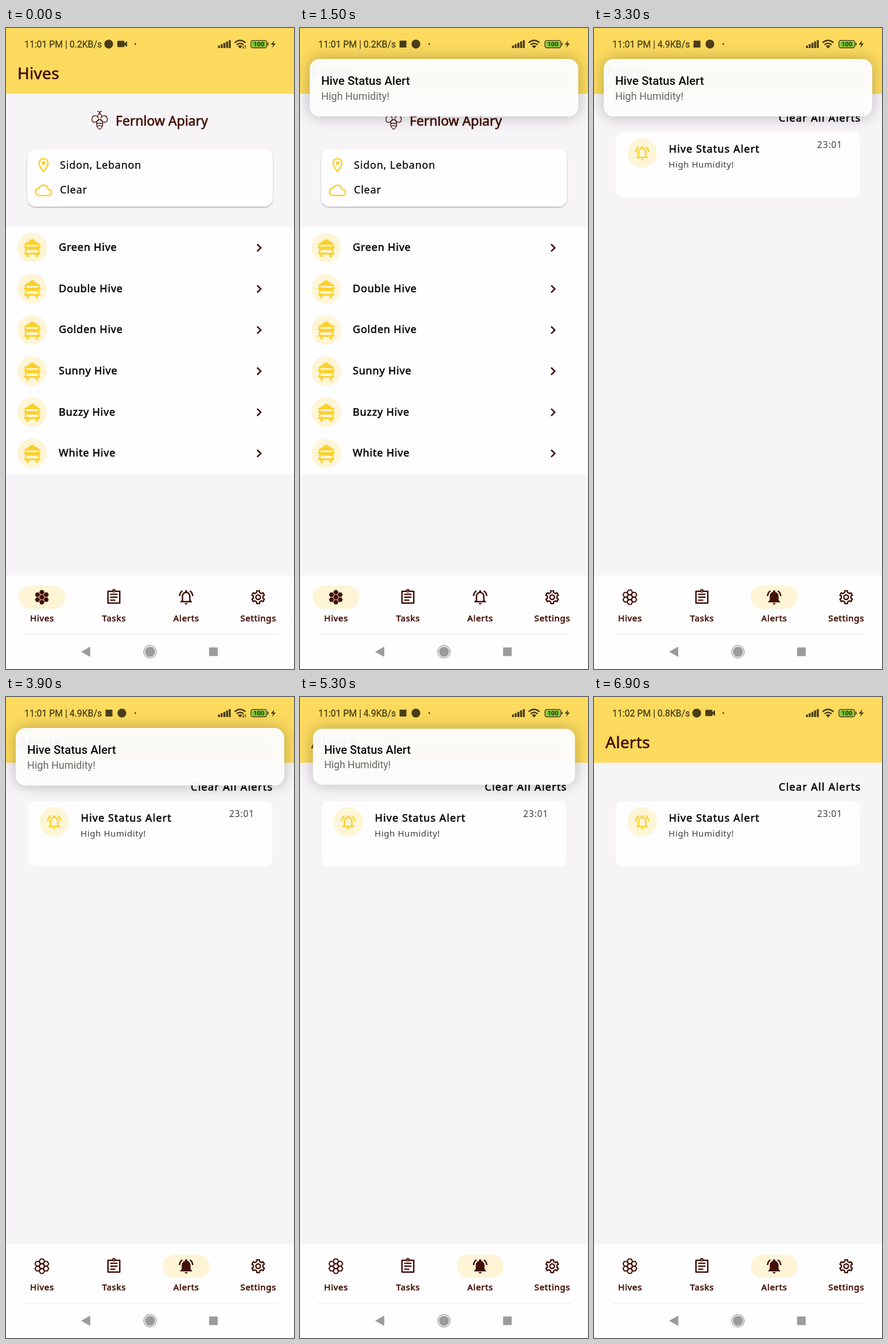
An HTML page that plays this animation: 502 by 1116 pixels, repeating every 7000 ms.

```html
<!DOCTYPE html>
<html lang="en">
<head>
<meta charset="utf-8">
<title>Hive alerts</title>
<style>
  html, body { margin: 0; width: 100%; height: 100%; overflow: hidden; background: #f6f4f7; }
  svg { display: block; width: 502px; height: 1116px; }
  text { font-family: "Noto Sans", "Open Sans", sans-serif; white-space: pre; fill: currentColor; }
  /* A thin outline gives the weights between regular and bold. */
  .medium { stroke: currentColor; stroke-width: .3px; }
  .semi { stroke: currentColor; stroke-width: .65px; }
  .title { font-size: 28px; letter-spacing: .3px; color: #431007; }
  .item { font-size: 18px; letter-spacing: .8px; color: #0b090b; }
  .tab { font-size: 15px; letter-spacing: .7px; color: #431007; text-anchor: middle; }
  .sys { font-family: Roboto, "Liberation Sans", sans-serif; }
  .line { fill: none; stroke-linecap: round; stroke-linejoin: round; }
</style>
</head>
<body>
<svg id="stage" viewBox="0 0 502 1116" xmlns="http://www.w3.org/2000/svg"></svg>
<script>
const BROWN = '#431007', GOLD = '#fbd02f', PALE = '#fdf5d6', INK = '#4a3d17', WHITE = '#fefdff';
const LOOP = 7000, STEP = 100, SWITCH = 3000, TABS = [62.7, 188, 314, 439.5];
const HIVES = ['Green', 'Double', 'Golden', 'Sunny', 'Buzzy', 'White'];

const text = (x, y, cls, s, more = '') => `<text x="${x}" y="${y}" class="${cls}" ${more}>${s}</text>`;
const rect = (x, y, w, h, fill, r = 0, more = '') =>
  `<rect x="${x}" y="${y}" width="${w}" height="${h}" rx="${r}" fill="${fill}" ${more}/>`;
const dot = (x, y, r, fill) => `<circle cx="${x}" cy="${y}" r="${r}" fill="${fill}"/>`;
const path = (d, more) => `<path d="${d}" ${more}/>`;
const stroke = (d, color, w) => path(d, `class="line" stroke="${color}" stroke-width="${w}"`);
const group = (id, body) => `<g id="${id}">${body}</g>`;
// Places a 24-unit icon around a centre point.
const icon = (x, y, body, k = 1.28) => `<g transform="translate(${x} ${y}) scale(${k}) translate(-12 -12)">${body}</g>`;
const polar = (r, deg) => {
  const a = deg * Math.PI / 180;
  return [(r * Math.cos(a)).toFixed(2), (r * Math.sin(a)).toFixed(2)];
};
const polygon = pts => 'M' + pts.map(p => p.join(' ')).join('L') + 'Z';

function honeycomb(x, y, solid) {
  const hex = polygon([0, 1, 2, 3, 4, 5].map(i => polar(solid ? 4.5 : 4.6, i * 60)));
  const centers = [[0, 0], ...[0, 1, 2, 3, 4, 5].map(i => polar(solid ? 8.7 : 8.4, i * 60 + 30))];
  const style = solid ? `fill="${BROWN}"` : `fill="none" stroke="${BROWN}" stroke-width="2"`;
  return centers.map(([a, b]) => path(hex, `transform="translate(${x + +a} ${y + +b})" ${style}`)).join('');
}

function gear(x, y) {
  const pts = [];
  for (let a = -90; a < 270; a += 60)
    pts.push(polar(8.6, a - 17), polar(11.4, a - 12), polar(11.4, a + 12), polar(8.6, a + 17));
  return `<g transform="translate(${x} ${y})">${stroke(polygon(pts), BROWN, 2.4)}
    <circle r="4" fill="none" stroke="${BROWN}" stroke-width="2.4"/></g>`;
}

function bell(x, y, color, solid, k) {
  const hole = solid ? '' : 'M16 17H8v-6c0-2.48 1.51-4.5 4-4.5s4 2.02 4 4.5z';
  return icon(x, y, path('M12 22c1.1 0 2-.9 2-2h-4c0 1.1.9 2 2 2z' +
    'M18 16v-5c0-3.07-1.63-5.64-4.5-6.32V4c0-.83-.67-1.5-1.5-1.5s-1.5.67-1.5 1.5v.68C7.64 5.36 6 7.92 6 11v5l-2 2v1h16v-1z' + hole +
    'M7.58 4.08L6.15 2.65C3.75 4.48 2.17 7.3 2.03 10.5h2c.15-2.65 1.51-4.97 3.55-6.42z' +
    'M19.97 10.5h2c-.15-3.2-1.73-6.02-4.12-7.85l-1.42 1.43c2.02 1.45 3.39 3.77 3.54 6.42z',
    `fill="${color}" fill-rule="evenodd"`), k);
}

const clipboard = (x, y) => icon(x, y,
  stroke('M4 4h16v16H4z', BROWN, 2) +
  path('M7 8h10M7 12h10M7 16h7', `stroke="${BROWN}" stroke-width="1.9"`) +
  dot(12, 3.2, 2.4, BROWN) + dot(12, 3.6, .8, WHITE));

// Roof, two boxes and a stand on legs
const hiveIcon = (x, y) => `<g transform="translate(${x} ${y})">` + dot(0, 0, 25.7, PALE) +
  path('M-15.5-5L0-15.5 15.5-5ZM-12.5-2h25v6h-25zM-12.5 4h2.5v5h-2.5zM10 4h2.5v5h-2.5z' +
    'M-15-2h30v2.5h-30zM-14 8.8h28v3.2h-28zM-10 12h4v4.5h-4zM6 12h4v4.5h-4z', `fill="${GOLD}"`) +
  path('M-12.5-5h2.5v3.5h-2.5zM10-5h2.5v3.5h-2.5z', `fill="${GOLD}"`) + '</g>';

const bee = stroke('M159.8 145q3.4.2 3.4 4.6q0-4.4 3.4-4.6M160 154.5q-.4-5 3.2-5t3.2 5' +
  'M161 157C157 150 150 152 149.8 159C149.8 166 157 166 161 159' +
  'M165.4 157C169.4 150 176.4 152 176.6 159C176.6 166 169.4 166 165.4 159' +
  'M158.5 163C156.5 170 160 174.5 163.2 176.5C166.4 174.5 170 170 168 163' +
  'M158.5 163q4.7-7 9.5 0M158 167q5.2-2.4 10.4 0M159 171q4.2-2.2 8.4 0', BROWN, 1.35);

const pin = icon(65.5, 239, path('M12 2C8.13 2 5 5.13 5 9c0 5.25 7 13 7 13s7-7.75 7-13c0-3.87-3.13-7-7-7z' +
  'M7 9c0-2.76 2.24-5 5-5s5 2.24 5 5c0 2.88-2.88 7.19-5 9.88C9.92 16.21 7 11.85 7 9z',
  `fill="${GOLD}" fill-rule="evenodd"`) + dot(12, 9, 2.5, GOLD), 1.27);

const cloud = icon(65.5, 282.7,
  stroke('M19 19H6a5 5 0 0 1-.5-9.97C7 6 9.3 5 12 5c3.1 0 5.7 2.2 6.4 5.9A4 4 0 0 1 19 19z', GOLD, 2));

function hivesPage() {
  const rows = HIVES.map((name, i) => {
    const y = 382.5 + i * 71.6;
    return hiveIcon(45.7, y) + text(92, y + 5.6, 'item semi', name + ' Hive') +
      path(`M437.8 ${y - 6}l6.3 6.2l-6.3 6.2`, `fill="none" stroke="${BROWN}" stroke-width="2.6"`);
  }).join('');
  return text(20, 89, 'title semi', 'Hives') + bee +
    text(191, 169.5, 'semi', 'Fernlow Apiary', `font-size="23" color="${BROWN}"`) +
    rect(37, 211, 428, 100, WHITE, 15, 'filter="url(#lift)"') + pin + cloud +
    text(94, 244.8, 'item medium', 'Sidon, Lebanon') +
    text(94, 288, 'item medium', 'Clear') +
    rect(0, 346.5, 502, 430, WHITE) + rows;
}

const alertsPage = () => text(20, 89, 'title semi', 'Alerts') +
  text(465.5, 162.5, 'item semi', 'Clear All Alerts', 'text-anchor="end" style="letter-spacing:1.3px"') +
  rect(38, 182, 426, 112, WHITE, 10) + dot(84, 217.5, 25.7, PALE) + bell(84, 217.8, GOLD, false, 1.26) +
  text(130.5, 217, 'item semi', 'Hive Status Alert', 'style="letter-spacing:1.1px"') +
  text(130, 243, '', 'High Humidity!', 'font-size="15" letter-spacing=".6" color="#3f3d41"') +
  text(389, 208.5, '', '23:01', 'font-size="15.5" letter-spacing=".9" color="#3f3d41"');

function statusBar() {
  const bars = [0, 1, 2, 3, 4].map(i => rect(369.5 + i * 4.7, 30.5 - i * 2.4, 3.5, 4.5 + i * 2.4, INK, 1)).join('');
  const wifi = path('M398.5 25.5q9.5-8 19 0M401.8 29.3q6.2-5 12.4 0', `fill="none" stroke="${INK}" stroke-width="2.5"`) +
    path('M404 31.6q4-3 8 0l-4 4.2z', `fill="${INK}"`);
  const arrows = stroke('M413.5 31v4.5m-1.3-1.3l1.3 1.5 1.3-1.5M417 35.5v-4.5m-1.3 1.3l1.3-1.5 1.3 1.5', INK, 1);
  return text(32, 33.8, 'sys medium', '', `id="clock" font-size="15.8" color="${INK}"`) +
    group('idleIcons', dot(179, 28, 7.7, INK) + rect(194, 22.3, 12.5, 11, INK, 1.5) + path('M206 27l5-4.3v10.6l-5-4.3z', `fill="${INK}"`)) +
    group('alertIcons', rect(173.5, 22, 12, 12, INK) + dot(202, 28, 7.7, INK)) +
    dot(225.3, 28, 1.5, INK) + bars + wifi + group('arrows', arrows) +
    rect(427, 21.8, 27.5, 12.6, '#d9df6d', 3.5, `stroke="${INK}" stroke-width="1.6"`) +
    rect(429, 23.8, 23.5, 8.6, '#70c52c', 1.5) + rect(455.8, 25.5, 1.8, 5, INK, .8) +
    text(440.8, 32, 'sys', '100', `font-size="10.8" font-weight="700" text-anchor="middle" color="#2d3c0d"`) +
    path('M467.5 21.5l-6 7.4h4l-1.5 5.6 6.2-7.6h-4z', `fill="${INK}"`);
}

const tabBar = () => rect(0, 953, 502, 163, '#fffeff') +
  rect(-41, -20.3, 82, 40.6, PALE, 20.3, 'id="pill"') +
  group('combOn', honeycomb(62.5, 991, true)) + group('combOff', honeycomb(62.5, 991, false)) +
  clipboard(188, 991) + group('bellOn', bell(314, 991, BROWN, true)) + group('bellOff', bell(314, 991, BROWN, false)) +
  gear(439.5, 991) +
  ['Hives', 'Tasks', 'Alerts', 'Settings'].map((s, i) => text(TABS[i] + .3, 1033, 'tab semi', s)).join('') +
  rect(30, 1055, 444, 1, '#ebeaec') +
  path('M131 1086l15.8-9v18z', 'fill="#9b9a9c"') + dot(251, 1086, 8.7, '#9b9a9c') +
  '<circle cx="251" cy="1086" r="10.8" fill="none" stroke="#9b9a9c" stroke-width="1.3"/>' +
  rect(354, 1078.5, 15, 15, '#9b9a9c');

const banner = () => rect(17, 54, 468, 100, '#000', 17, 'opacity=".26" filter="url(#soft)"') +
  rect(17, 54, 468, 100, '#fefefe', 17, 'opacity=".96"') +
  text(37, 99, 'sys', 'Hive Status Alert', 'font-size="20.5" font-weight="500" color="#0c0c0c"') +
  text(37, 124.7, 'sys', 'High Humidity!', 'font-size="18.1" color="#676767"');

document.getElementById('stage').innerHTML = `<defs>
  <filter id="lift" x="-5%" y="-10%" width="110%" height="130%"><feDropShadow dx="0" dy="1.5" stdDeviation="1.2" flood-opacity=".3"/></filter>
  <filter id="soft" x="-20%" y="-60%" width="140%" height="220%"><feGaussianBlur stdDeviation="13"/></filter></defs>` +
  rect(0, 0, 502, 1116, '#f6f4f7') + rect(0, 0, 502, 114.5, '#fbda5e') +
  group('hives', hivesPage()) + group('alerts', alertsPage()) + tabBar() + group('banner', banner()) + statusBar();

// Banner pose: time, rise, scale, opacity
const POSES = [[200, -130, .9, 0], [300, -80, .93, .7], [400, -28, .975, 1], [500, -6, .995, 1], [600, 0, 1, 1],
  [5200, 0, 1, 1], [5300, 0, .976, 1], [5400, -14, .88, .45], [5500, -30, .8, 0]];
const SPEEDS = [[0, '11:01 PM | 0.2KB/s'], [2600, '11:01 PM | 4.9KB/s'], [6600, '11:02 PM | 0.8KB/s']];

const el = id => document.getElementById(id);
const show = (id, on) => { el(id).style.display = on ? '' : 'none'; };

function poseAt(t) {
  const i = POSES.findIndex(p => p[0] > t);
  if (i < 1) return [0, 1, 0];
  const a = POSES[i - 1], b = POSES[i], u = (t - a[0]) / (b[0] - a[0]);
  return [1, 2, 3].map(k => a[k] + (b[k] - a[k]) * u);
}

function render(t) {
  const onAlerts = t >= SWITCH, alerting = t >= 300 && t < 5500;
  ['hives', 'combOn', 'bellOff'].forEach(id => show(id, !onAlerts));
  ['alerts', 'combOff', 'bellOn'].forEach(id => show(id, onAlerts));
  show('idleIcons', !alerting);
  show('alertIcons', alerting);
  show('arrows', t < 300 || (t >= 3600 && t < 4400));
  el('clock').textContent = SPEEDS.filter(s => s[0] <= t).pop()[1];

  const grow = onAlerts ? 1 - (1 - Math.min(1, (t - SWITCH + STEP) / 400)) ** 3 : 1;
  el('pill').setAttribute('transform', `translate(${TABS[onAlerts ? 2 : 0]} 991) scale(${grow} 1)`);

  const [rise, scale, alpha] = poseAt(t);
  show('banner', alpha > 0);
  el('banner').setAttribute('opacity', alpha);
  el('banner').setAttribute('transform', `translate(251 ${103.7 + rise}) scale(${scale}) translate(-251 -103.7)`);
}

function tick() {
  render(Math.floor(performance.now() % LOOP / STEP) * STEP);
  requestAnimationFrame(tick);
}
tick();
</script>
</body>
</html>
```
